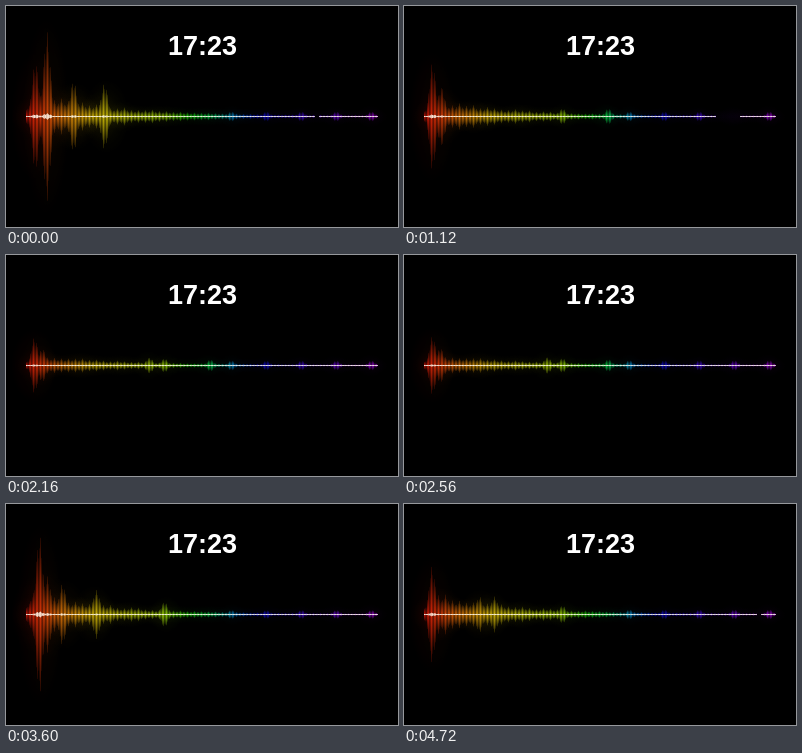
Animation of 392 by 221 pixels, one loop 4.8 s. Source, as an HTML page with a canvas:

```html
<!DOCTYPE html>
<html lang="en">
<head>
<meta charset="utf-8">
<title>Spectrum clock</title>
<style>
  html, body { margin: 0; width: 100%; height: 100%; overflow: hidden; background: #000; }
  canvas, svg { position: absolute; left: 0; top: 0; display: block; }
  text { font: bold 27px "Liberation Sans", Arial, sans-serif; fill: #fff; text-anchor: middle; }
</style>
</head>
<body>
<canvas id="view" width="392" height="221"></canvas>
<svg width="392" height="221"><text x="196.5" y="49">17:23</text></svg>
<script>
const W = 392, H = 221, LOOP = 4800, STEP = 80;
const LEFT = 20, RIGHT = 372, AXIS = 110.5, NOTE = 7, SPIKE = 3.5;
const ctx = document.getElementById('view').getContext('2d');

// Each chord sounds from..to and is at its plain level at `at`.
// body: level of the falling floor, peaks: [x, height], gap: silent stretch
const CHORDS = [
  { from: 0, at: 0, to: 0, body: 31, peaks: [[29, 55], [40.5, 85], [67, 36], [98, 33]], gap: [309, 313] },
  { from: 240, at: 480, to: 560, body: 24, peaks: [[28, 43], [41, 31], [67, 25], [98, 17], [158, 20]] },
  { from: 800, at: 1120, to: 1520, body: 21, peaks: [[28, 54], [37, 30], [158, 8], [204, 8]], gap: [312, 336] },
  { from: 1600, at: 2160, to: 2720, body: 13, peaks: [[28, 28], [36, 17], [143, 8], [158, 7], [204, 6]] },
  { from: 2960, at: 3040, to: 3360, body: 9, peaks: [[34.5, 47], [67, 17], [137, 9], [158, 7]], gap: [338, 346] },
  { from: 3440, at: 4160, to: 4160, body: 29, peaks: [[33, 88], [41, 42], [56, 34], [90, 27], [158, 14]] },
  { from: 4320, at: 4720, to: 4800, body: 26, peaks: [[27.5, 48], [75, 18], [90, 18], [158, 9]], gap: [353, 357] }
];
const HELD = [240, 1360, 1680, 2240, 2640, 2800, 3840, 4080, 4400];

// x, hue
const HUES = [[20, 4], [36, 14], [52, 28], [85, 50], [158, 76], [183, 115], [204, 140], [227, 200], [250, 238], [371, 285]];
const rainbow = ctx.createLinearGradient(0, 0, W, 0);
for (const [x, hue] of HUES) rainbow.addColorStop(x / W, `hsl(${hue} 95% 45%)`);

const white = a => `rgba(255,255,255,${a})`;
const bell = (d, w) => Math.exp(-((d / w) ** 2));
const wave = (x, period) => 0.5 + 0.5 * Math.cos((x - 34) / period * 2 * Math.PI);
const rand = n => Math.abs(Math.sin(n * 12.9898) * 43758.5453) % 1;

function levels(chord, seed) {
  return Array.from({ length: W }, (_, x) => {
    const note = Math.round((x - 34) / NOTE);
    const rough = (0.7 + 0.3 * rand(note + seed * 61)) * (0.7 + 0.3 * wave(x, NOTE));
    let h = 1 + chord.body * Math.exp((LEFT - x) / 75) * rough;
    for (const [p, amp] of chord.peaks) h = Math.max(h, amp * bell(x - p, 5));
    for (let p = 225; p < RIGHT; p += 35) h = Math.max(h, 5 * bell(x - p, 5));
    return h * Math.max(0, Math.min(1, (x - LEFT + 2) / 7));
  });
}
const LEVELS = CHORDS.map(levels);

function soundAt(t) {
  let i = CHORDS.length - 1;
  while (CHORDS[i].from > t) i--;
  const a = CHORDS[i], j = Math.min(i + 1, CHORDS.length - 1), b = CHORDS[j];
  const k = t > a.to ? (t - a.to) / (b.from - a.to) : 0;
  const swell = 1 + 0.1 * Math.sin((a.at - t) / 110) * (1 - k);
  return {
    hs: LEVELS[i].map((h, x) => (h + (LEVELS[j][x] - h) * k) * swell),
    gap: (k < 0.5 ? a : b).gap || [0, 0]
  };
}

function glow(x, h) {
  ctx.save();
  ctx.translate(x, AXIS);
  ctx.scale(11 + Math.min(12, h / 2), 6 + h * 1.1);
  const g = ctx.createRadialGradient(0, 0, 0, 0, 0, 1);
  g.addColorStop(0, white(0.06 * Math.min(1, 0.2 + h / 15)));
  g.addColorStop(1, white(0));
  ctx.fillStyle = g;
  ctx.fillRect(-1, -1, 2, 2);
  ctx.restore();
}

function bar(x, h, alpha) {
  const g = ctx.createLinearGradient(0, AXIS - h, 0, AXIS + h);
  for (const [at, a] of [[0, 0.15], [0.25, 0.58], [0.5, 1], [0.75, 0.58], [1, 0.15]]) {
    g.addColorStop(at, white(a * alpha));
  }
  ctx.fillStyle = g;
  ctx.fillRect(x, AXIS - h, 1, 2 * h);
}

function draw(t) {
  const { hs, gap } = soundAt(t);
  const silent = x => x >= gap[0] && x < gap[1];
  ctx.globalCompositeOperation = 'source-over';
  ctx.fillStyle = '#000';
  ctx.fillRect(0, 0, W, H);
  for (let x = LEFT + 2; x < RIGHT; x += 6) glow(x, hs[x]);
  for (let x = LEFT; x < RIGHT; x++) {
    const c = wave(x, SPIKE);
    if (!silent(x)) bar(x, hs[x] * (0.72 + 0.28 * c), 0.4 + 0.5 * c);
  }
  ctx.globalCompositeOperation = 'multiply';
  ctx.fillStyle = rainbow;
  ctx.fillRect(0, 0, W, H);

  ctx.globalCompositeOperation = 'source-over';
  for (let x = LEFT; x < RIGHT; x++) {
    if (silent(x)) continue;
    const h = Math.max(0.5, hs[x] * (0.6 + 0.4 * wave(x, SPIKE)) / 27);
    ctx.fillStyle = `rgba(255,250,238,${0.8 + 0.1 * Math.sin(x * 2.3)})`;
    ctx.fillRect(x, AXIS - h, 1, 2 * h);
  }
}

let shown = -1;
function tick() {
  let t = Math.floor(performance.now() % LOOP / STEP) * STEP;
  if (HELD.includes(t)) t -= STEP;
  if (t !== shown) draw(shown = t);
  requestAnimationFrame(tick);
}
tick();
</script>
</body>
</html>
```
